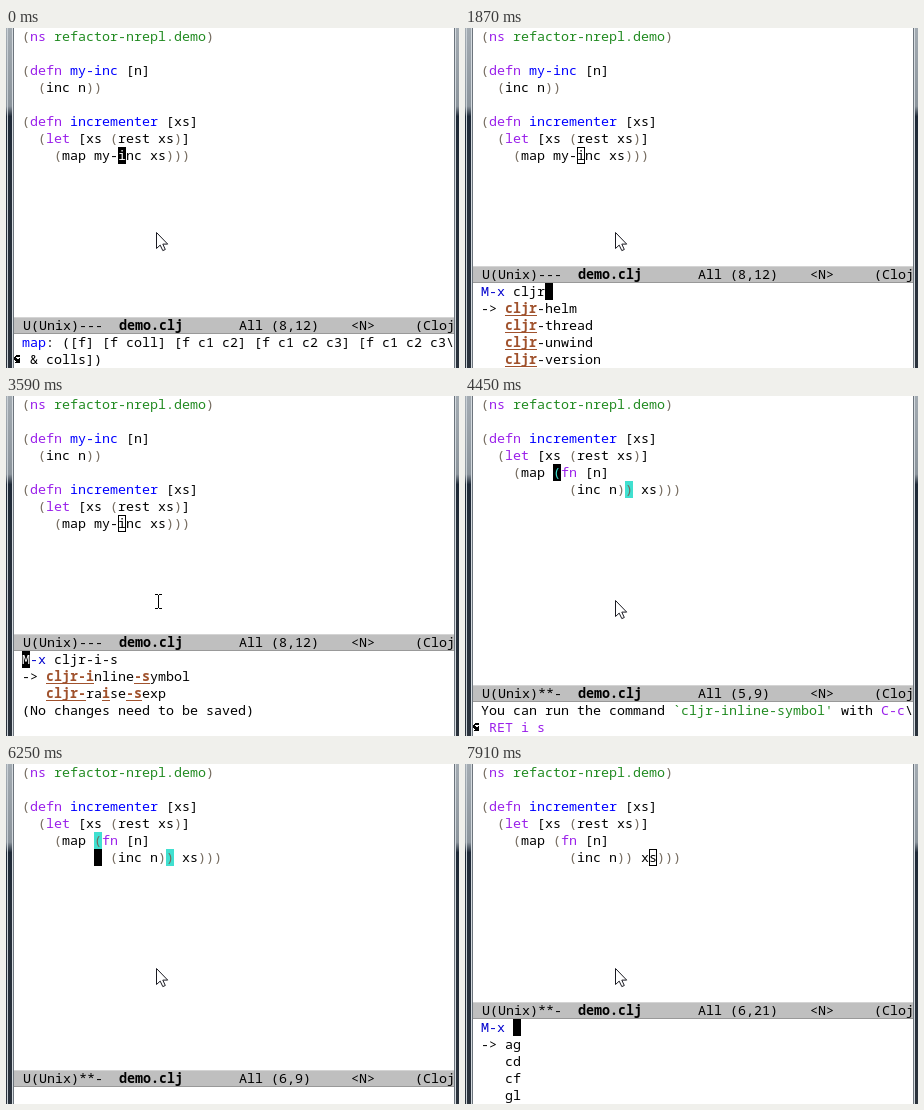
An HTML page with a canvas for the animation above (8 s loop, 453 by 340 pixels).

```html
<!DOCTYPE html>
<html lang="en">
<head>
<meta charset="utf-8">
<title>Inline symbol demo</title>
<style>
  html, body { margin: 0; width: 100%; height: 100%; overflow: hidden; background: #fff; }
  canvas { display: block; }
</style>
</head>
<body>
<canvas id="stage" width="453" height="340"></canvas>
<script>
const ctx = document.getElementById('stage').getContext('2d', { alpha: false });
const W = 453, H = 340, CELL = 8, LINE = 17, LEFT = 16, RIGHT = 448, LOOP = 8000;
const FONT = '13.333px "Noto Sans Mono", "DejaVu Sans Mono", monospace';
const INK = '#000', PAREN = '#746a5e', KEYWORD = '#9a20ea', NAME = '#0000ff',
      SPACE = '#228b22', PROMPT = '#0000cd', FLEX = '#a0522d', MATCH = '#40e0d0';

const BEFORE = [
  '(ns refactor-nrepl.demo)', '',
  '(defn my-inc [n]', '  (inc n))', '',
  '(defn incrementer [xs]', '  (let [xs (rest xs)]', '    (map my-inc xs)))'];
const AFTER = [
  '(ns refactor-nrepl.demo)', '',
  '(defn incrementer [xs]', '  (let [xs (rest xs)]',
  '    (map (fn [n]', '           (inc n)) xs)))'];

const COMMANDS = ['ag', 'cd', 'cf', 'gl'];
const SHORT = ['cljr-helm', 'cljr-thread', 'cljr-unwind', 'cljr-version'];
const WITH_I = ['cljr-inline-symbol', 'cljr-introduce-let', 'cljr-add-import-to-ns', 'cljr-find-usages'];
const WITH_S = ['cljr-inline-symbol', 'cljr-raise-sexp',
  'cljr-splice-sexp-killing-forward', 'cljr-splice-sexp-killing-backward'];

// Echo lines are lists of [text, colour, bold] runs.
const MAP_DOC = [
  [['map', NAME], [': ([f] [f coll] [f c1 c2] [f c1 c2 c3] [f c1 c2 c3\\']],
  [[' & colls])']]];
const KEY_HINT = [
  [['You can run the command '], ["`cljr-inline-symbol'", SPACE], [' with '], ['C-c', KEYWORD], ['\\']],
  [[' RET i s', KEYWORD]]];
const FN_DOC = [[['fn', NAME], [': ([& '], ['sigs', INK, true], ['])']]];

// Parenthesis pairs as [row, column].
const FN_PAIR = [[4, 9], [5, 18]], DEFN_PAIR = [[2, 0], [5, 24]],
      LET_PAIR = [[3, 2], [5, 23]], MAP_PAIR = [[4, 4], [5, 22]];

// Each step changes only the named parts of the state.
const STEPS = [
  [0, { code: BEFORE, point: [7, 12], cursor: 'solid', pair: [], flags: '---', echo: MAP_DOC, query: null }],
  [130, { cursor: 'off' }],
  [660, { cursor: 'solid' }],
  [800, { cursor: 'hollow', query: '', list: COMMANDS, caret: 4 }],
  [1420, { query: 'clj', list: SHORT, caret: 7 }],
  [1870, { query: 'cljr', caret: 8 }],
  [2020, { query: 'cljr-', caret: 9 }],
  [2330, { query: 'cljr-i', list: WITH_I, caret: 10 }],
  [2630, { query: 'cljr-i-', caret: 11 }],
  [2750, { query: 'cljr-i-s', list: WITH_S, caret: 12 }],
  [3320, { caret: -1 }],
  [3590, { list: WITH_S.slice(0, 2), caret: 0, note: '(No changes need to be saved)', beam: true }],
  [4450, { code: AFTER, point: [4, 9], cursor: 'solid', pair: FN_PAIR, flags: '**-',
           echo: KEY_HINT, query: null, note: '', beam: false }],
  [4870, { cursor: 'off' }],
  [5450, { cursor: 'solid' }],
  [5850, { cursor: 'off' }],
  [6250, { point: [5, 9], cursor: 'solid', echo: [[]] }],
  [6400, { pair: [] }],
  [6800, { point: [5, 24], echo: FN_DOC }],
  [6930, { pair: DEFN_PAIR }],
  [7080, { point: [5, 23], pair: LET_PAIR }],
  [7200, { point: [5, 22] }],
  [7330, { pair: MAP_PAIR }],
  [7480, { point: [5, 21] }],
  [7630, { pair: [] }],
  [7910, { cursor: 'hollow', query: '', list: COMMANDS, caret: 4 }]];

function stateAt(time) {
  return Object.assign({}, ...STEPS.filter(([start]) => start <= time).map(([, change]) => change));
}

function box(x, y, w, h, color) {
  ctx.fillStyle = color;
  ctx.fillRect(x, y, w, h);
}

function text(string, x, y, color = INK, bold = false) {
  ctx.font = (bold ? 'bold ' : '') + FONT;
  ctx.fillStyle = color;
  [...string].forEach((char, i) => ctx.fillText(char, x + i * CELL, y + 13));
  return x + string.length * CELL;
}

function drawCode(line, y) {
  const tokens = line.match(/[()]|[^\s()]+|\s+/g) || [];
  let x = LEFT;
  tokens.forEach((token, i) => {
    const head = tokens[i - 2];
    const color = /[()]/.test(token) ? PAREN
      : /^(ns|defn|let|fn)$/.test(token) ? KEYWORD
      : head === 'defn' ? NAME
      : head === 'ns' ? SPACE : INK;
    x = text(token, x, y, color);
  });
}

function fillCell([row, col], code, background, color) {
  const x = LEFT + col * CELL, y = row * LINE;
  box(x, y, CELL, LINE, background);
  text(code[row][col] || ' ', x, y, color);
}

function drawBuffer({ code, point, cursor, pair }) {
  code.forEach((line, row) => drawCode(line, row * LINE));
  pair.forEach(cell => fillCell(cell, code, MATCH, PAREN));
  const matched = pair.some(cell => String(cell) === String(point));
  if (cursor === 'solid') fillCell(point, code, INK, matched ? MATCH : '#fff');
  if (cursor === 'hollow') {
    ctx.strokeStyle = INK;
    ctx.lineWidth = 1;
    ctx.strokeRect(LEFT + point[1] * CELL + .5, point[0] * LINE + .5, CELL - 1, LINE - 1);
  }
}

function drawStatus({ point, flags }, y) {
  box(8, y, RIGHT - 8, LINE, '#bfbfbf');
  box(8, y, RIGHT - 8, 1, '#d4d4d4');
  box(8, y + LINE - 1, RIGHT - 8, 1, '#999');
  const x = LEFT + 1, place = `(${point[0] + 1},${point[1]})`;
  text('U(Unix)' + flags, x, y);
  text('demo.clj', x + 12 * CELL, y, INK, true);
  text(`All ${place.padEnd(10)}<N>     (Cloj`, x + 27 * CELL, y);
}

// Marks the characters of the query in the order they occur.
function drawCandidate(name, query, y) {
  let found = 0;
  [...name].forEach((char, i) => {
    const x = LEFT + (3 + i) * CELL, hit = char === query[found];
    text(char, x, y, hit ? FLEX : INK, hit);
    if (hit) {
      found++;
      box(x, y + 15, CELL, 1, FLEX);
    }
  });
}

function drawPrompt({ query, list, caret, note }, top) {
  text('M-x', LEFT, top, PROMPT);
  text(query, LEFT + 4 * CELL, top);
  if (caret >= 0) {
    box(LEFT + caret * CELL, top, CELL, LINE, INK);
    if (caret === 0) text('M', LEFT, top, '#fff');
  }
  text('->', LEFT, top + LINE);
  list.forEach((name, i) => drawCandidate(name, query, top + (i + 1) * LINE));
  if (note) text(note, LEFT, top + (list.length + 1) * LINE);
}

function drawWrapArrow(y) {
  [0x3c, 0x7c, 0xc0, 0xe4, 0xfc, 0x7c, 0x3c, 0x7c].forEach((bits, row) => {
    for (let col = 0; col < 8; col++)
      if (bits & (128 >> col)) box(8 + col, y + row, 1, 1, INK);
  });
}

function drawEcho(lines, top) {
  lines.forEach((runs, i) => {
    let x = LEFT;
    for (const [string, color, bold] of runs) x = text(string, x, top + i * LINE, color, bold);
    if (i) drawWrapArrow(top + i * LINE + 4);
  });
}

function drawPointer(beam) {
  if (beam) {
    box(152, 199, 1, 13, INK);
    for (const y of [198, 212]) {
      box(149, y, 3, 1, INK);
      box(153, y, 3, 1, INK);
    }
    return;
  }
  const arrow = new Path2D('M150.5 204.5v16l3.7-3.4 2.6 5.5 2.5-1.1-2.5-5.4h4.9z');
  ctx.fillStyle = '#fff';
  ctx.fill(arrow);
  ctx.strokeStyle = '#1a1a22';
  ctx.lineWidth = 1;
  ctx.stroke(arrow);
}

function drawFrame() {
  const glass = ctx.createLinearGradient(0, 0, 0, H);
  [[0, '#a3abb2'], [.23, '#8b949c'], [.26, '#1d2836'], [.4, '#232d39'], [1, '#2a323c']]
    .forEach(([stop, color]) => glass.addColorStop(stop, color));
  box(0, 0, 8, H, glass);
  box(RIGHT, 0, W - RIGHT, H, glass);
  box(1, 0, 1, H, '#c9d0d6');
  box(6, 0, 1, H, '#d5dbe0');
  box(7, 0, 1, H, '#6d757d');
  box(RIGHT, 0, 1, H, '#6d757d');
  box(RIGHT + 1, 0, 1, H, '#d5dbe0');
}

function draw(now) {
  const state = stateAt(now % LOOP);
  const asking = state.query !== null;
  const top = H - LINE * (asking ? 5 : state.echo.length);
  box(0, 0, W, H, '#fff');
  drawBuffer(state);
  drawStatus(state, top - LINE);
  if (asking) drawPrompt(state, top);
  else drawEcho(state.echo, top);
  drawPointer(state.beam);
  drawFrame();
}

const start = performance.now();
function tick() {
  draw(performance.now() - start);
  requestAnimationFrame(tick);
}
tick();
</script>
</body>
</html>
```
